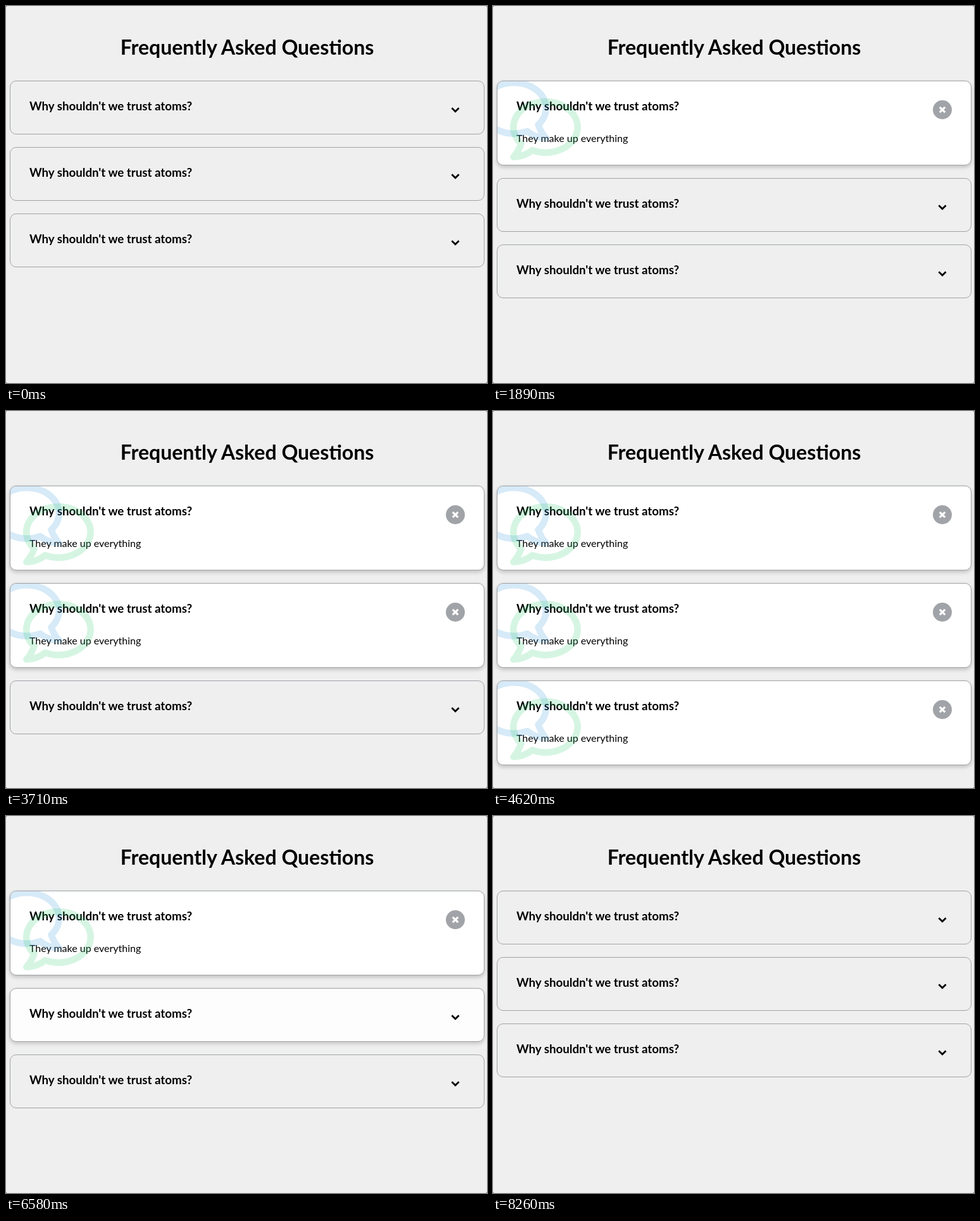
Write an HTML page that moves like this. It is 760x596 px and loops after 8610 ms.

```html
<!DOCTYPE html>
<html lang="en">
<head>
<meta charset="utf-8">
<title>Frequently Asked Questions</title>
<style>
  html, body { margin: 0; width: 100%; height: 100%; overflow: hidden; }
  html { background: #555; }
  body { position: relative; background: #efefef; border-radius: 2px; font-family: Lato, sans-serif; color: #000; }
  svg { position: absolute; overflow: visible; }
  .heading { left: 0; top: 0; font-size: 32px; font-weight: 700; }
  .card {
    position: absolute; left: 6px; width: 750px; height: 85px;
    box-sizing: border-box; border: 1px solid #a0a3a7; border-radius: 10px; overflow: hidden;
  }
  .card svg { left: -1px; top: -1px; }
  .question { font-size: 18.72px; font-weight: 700; }
  .answer { font-size: 16px; }
  .chevron, .cross { fill: none; stroke: #000; stroke-width: 2.8; }
  .cross { stroke: #fff; stroke-width: 3.2; }
  .bubble { fill: none; stroke-width: 48; stroke-linejoin: round; opacity: .2; }
  .card.open { height: 134px; }
  .card:not(.open) .when-open, .card.open .when-closed { display: none; }
</style>
</head>
<body>
<svg class="heading" width="760" height="110">
  <text x="381" y="77" text-anchor="middle">Frequently Asked Questions</text>
</svg>
<script>
const LOOP = 8610;
const TICK = 70;
const FADE = 300;
const FADE_LEAD = 30; // the fade is already under way when a card first changes size
const FIRST_TOP = 118;
const GAP = 20;
const schedule = [
  { open: 1540, close: 7700 },
  { open: 2870, close: 6580 },
  { open: 4200, close: 5390 },
];

const BUBBLE = 'M80 360A232 184 0 1 1 160 407.5Q100 455 24 456Q58 420 80 360Z';
const cardContent = `
  <svg width="750" height="134">
    <text class="question" x="31" y="47">Why shouldn't we trust atoms?</text>
    <text class="answer when-open" x="31" y="97">They make up everything</text>
    <path class="chevron when-closed" d="M698.4 43.2l5.6 5.5 5.6-5.5"/>
    <g class="when-open">
      <circle cx="704" cy="46" r="15" fill="#a0a3a7"/>
      <path class="cross" d="M699.8 41.8l8.4 8.4m0-8.4l-8.4 8.4"/>
      <path class="bubble" stroke="#3498db" transform="translate(83 -9) scale(-.21875 .21875)" d="${BUBBLE}"/>
      <path class="bubble" stroke="#2ecc71" transform="translate(21 21) scale(.21875)" d="${BUBBLE}"/>
    </g>
  </svg>`;

const shadow = alpha => Array(2).fill(`0 3px 6px rgba(0,0,0,${alpha})`).join(', ');
const flat = { backgroundColor: 'rgba(255,255,255,0)', boxShadow: shadow(0) };
const raised = { backgroundColor: 'rgba(255,255,255,1)', boxShadow: shadow(.1) };

function createCard({ open, close }) {
  const element = document.createElement('div');
  element.className = 'card';
  element.innerHTML = cardContent;
  document.body.append(element);

  const at = (time, style, easing = 'linear') => ({ ...style, easing, offset: time / LOOP });
  const fadeIn = open - FADE_LEAD;
  const fadeOut = close - FADE_LEAD;
  const fade = element.animate([
    at(0, flat),
    at(fadeIn, flat, 'ease'),
    at(fadeIn + FADE, raised),
    at(fadeOut, raised, 'ease'),
    at(fadeOut + FADE, flat),
    at(LOOP, flat),
  ], { duration: LOOP, fill: 'both' });
  fade.pause();
  return { element, fade, open, close };
}

const cards = schedule.map(createCard);

function render(time) {
  let top = FIRST_TOP;
  for (const { element, fade, open, close } of cards) {
    const isOpen = time >= open && time < close;
    element.classList.toggle('open', isOpen);
    element.style.top = `${top}px`;
    fade.currentTime = time;
    top += (isOpen ? 134 : 85) + GAP;
  }
}

const start = performance.now();
function frame() {
  const elapsed = (performance.now() - start) % LOOP;
  render(Math.floor(elapsed / TICK) * TICK);
  requestAnimationFrame(frame);
}
frame();
</script>
</body>
</html>
```
